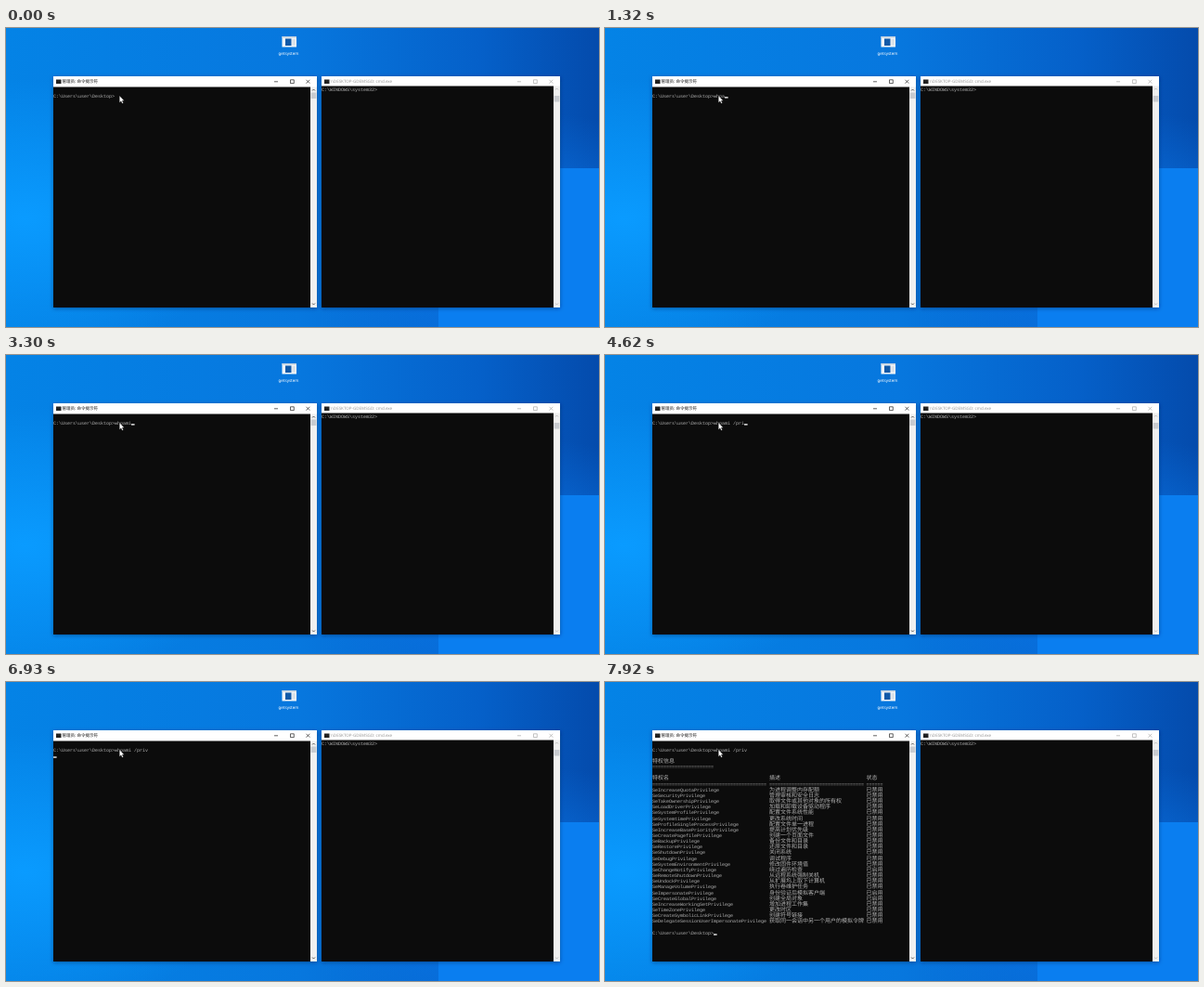
An HTML page for the animation above (8000 ms loop, 639 by 322 pixels).

```html
<!DOCTYPE html>
<html lang="zh-CN">
<head>
<meta charset="utf-8">
<title>Console session</title>
<style>
  html, body { margin: 0; width: 100%; height: 100%; overflow: hidden; background: #0878dc; }
  svg { display: block; width: 100%; height: 100%; }
  text { white-space: pre; text-rendering: geometricPrecision; }
  .ui { font: 4.5px "Noto Sans", "Noto Sans CJK SC", "Noto Sans CJK", sans-serif; }
  .mono { font: 5px "Liberation Mono", monospace; fill: #b4b4b4; }
  .han { font: 6px "Noto Sans CJK SC", "Noto Sans CJK", sans-serif; fill: #b4b4b4; }
</style>
</head>
<body>
<svg id="stage" viewBox="0 0 639 322" preserveAspectRatio="none">
  <defs>
    <linearGradient id="sky">
      <stop offset="0" stop-color="#0483e6"/>
      <stop offset=".5" stop-color="#0777de"/>
      <stop offset=".8" stop-color="#0560c9"/>
      <stop offset="1" stop-color="#044bac"/>
    </linearGradient>
    <radialGradient id="leftGlow">
      <stop offset="0" stop-color="#0a9bff"/>
      <stop offset="1" stop-color="#0a9bff" stop-opacity="0"/>
    </radialGradient>
    <radialGradient id="rightGlow">
      <stop offset="0" stop-color="#0a78ea"/>
      <stop offset="1" stop-color="#0a78ea" stop-opacity="0"/>
    </radialGradient>
    <filter id="shadow" x="-5%" y="-5%" width="110%" height="110%">
      <feDropShadow dx="0" dy="1" stdDeviation="2" flood-color="#002050" flood-opacity=".5"/>
    </filter>
  </defs>
  <rect width="639" height="322" fill="url(#sky)"/>
  <ellipse cx="20" cy="205" rx="240" ry="150" fill="url(#leftGlow)"/>
  <ellipse cx="560" cy="250" rx="240" ry="160" fill="url(#rightGlow)"/>
  <rect x="466" y="151" width="173" height="171" fill="#0a7ef0"/>
  <g id="icon">
    <rect x="297.5" y="9" width="15.5" height="11.5" fill="#f2f5f8"/>
    <rect x="297.5" y="9" width="15.5" height="1.6" fill="#c5d3e0"/>
    <rect x="301" y="11.5" width="6.5" height="7.5" fill="#125aa8"/>
    <rect x="308.5" y="12" width="3.5" height="6.5" fill="#dbe2e8"/>
    <text class="ui" x="304.5" y="28.8" text-anchor="middle" fill="#fff">getsystem</text>
  </g>
  <g id="windows"></g>
  <g id="typed">
    <text id="command" class="mono" x="51" y="74.6"></text>
    <g id="output"></g>
    <rect id="cursor" width="3.6" height="1.5" fill="#e0e0e0"/>
  </g>
  <path d="M122.3 73v7.2l1.7-1.5 1.2 2.6 1.2-.6-1.2-2.5h2.1z" fill="#fff" stroke="#222" stroke-width=".3"/>
</svg>
<script>
const LOOP = 8000, LEFT = 51, CELL = 3, BASE = 74.6, PITCH = 6.16;
const PROMPT = 'C:\\Users\\user\\Desktop>';
const DESC_COL = 42, STATE_COL = 76.8;
const $ = id => document.getElementById(id);

function add(parent, tag, attrs, content = '') {
  const node = document.createElementNS('http://www.w3.org/2000/svg', tag);
  for (const key in attrs) node.setAttribute(key, attrs[key]);
  node.textContent = content;
  return parent.appendChild(node);
}

const rowY = row => BASE + row * PITCH;
const print = (row, col, content, cls = 'mono') =>
  add($('output'), 'text', { class: cls, x: LEFT + col * CELL, y: rowY(row) }, content);

function drawWindow({ x, width, top, title, ink, controls, thumb }) {
  const g = add($('windows'), 'g', {});
  const right = x + width, bar = right - 7;
  const rect = (rx, ry, w, h, fill) => add(g, 'rect', { x: rx, y: ry, width: w, height: h, fill });
  const line = d => add(g, 'path', { d, fill: 'none', stroke: controls, 'stroke-width': .7 });

  rect(x, 52, width, 249, '#fff').setAttribute('filter', 'url(#shadow)');
  rect(x, top, bar - x, 301 - top, '#0c0c0c');
  rect(bar, top, 7, 301 - top, '#f0f0f0');
  rect(bar + .6, thumb, 5.8, 6.5, '#c8cbd0');
  line(`M${bar + 2} ${top + 4}l1.5-1.5 1.5 1.5M${bar + 2} 296.5l1.5 1.5 1.5-1.5`);
  rect(x + 3, 55.5, 5.5, 4.5, '#222');
  add(g, 'text', { class: 'ui', x: x + 9.5, y: 59.4, fill: ink }, title);
  line(`M${right - 46} 57.8h4M${right - 28.5} 55.8h3.8v3.8h-3.8zM${right - 11.5} 55.8l3.8 3.8m0-3.8l-3.8 3.8`);
}

drawWindow({ x: 51, width: 284, top: 63.5, title: '管理员: 命令提示符', ink: '#111', controls: '#222', thumb: 69.5 });
drawWindow({ x: 340, width: 257, top: 62.5, title: '\\\\DESKTOP-GDEMSGD: cmd.exe', ink: '#999', controls: '#aaa', thumb: 73 });
add($('windows'), 'text', { class: 'mono', x: 340, y: 68 }, 'C:\\WINDOWS\\system32>');

const privileges = `IncreaseQuota 为进程调整内存配额
Security 管理审核和安全日志
TakeOwnership 取得文件或其他对象的所有权
LoadDriver 加载和卸载设备驱动程序
SystemProfile 配置文件系统性能
Systemtime 更改系统时间
ProfileSingleProcess 配置文件单一进程
IncreaseBasePriority 提高计划优先级
CreatePagefile 创建一个页面文件
Backup 备份文件和目录
Restore 还原文件和目录
Shutdown 关闭系统
Debug 调试程序
SystemEnvironment 修改固件环境值
ChangeNotify 绕过遍历检查 +
RemoteShutdown 从远程系统强制关机
Undock 从扩展坞上取下计算机
ManageVolume 执行卷维护任务
Impersonate 身份验证后模拟客户端 +
CreateGlobal 创建全局对象 +
IncreaseWorkingSet 增加进程工作集
TimeZone 更改时区
CreateSymbolicLink 创建符号链接
DelegateSessionUserImpersonate 获取同一会话中另一个用户的模拟令牌`.split('\n');

print(2, 0, '特权信息', 'han');
print(3, 0, '='.repeat(22));
[[0, '特权名', 41], [DESC_COL, '描述', 34], [STATE_COL, '状态', 6]].forEach(([col, head, size]) => {
  print(5, col, head, 'han');
  print(6, col, '='.repeat(size));
});
privileges.forEach((entry, i) => {
  const [name, description, enabled] = entry.split(' ');
  print(7 + i, 0, `Se${name}Privilege`);
  print(7 + i, DESC_COL, description, 'han');
  print(7 + i, STATE_COL, enabled ? '已启用' : '已禁用', 'han');
});
print(32, 0, PROMPT);

// start time, typed command, cursor row (-1 = hidden)
const steps = [
  [0, '', -1], [660, '', 0], [990, 'wh', 0], [1320, 'whoa', 0],
  [1650, 'whoam', 0], [1980, 'whoami', 0], [2640, 'whoami', -1], [3300, 'whoami', 0],
  [3960, 'whoami /', 0], [4290, 'whoami /p', 0], [4620, 'whoami /pri', 0],
  [4950, 'whoami /priv', 0], [5280, 'whoami /priv', -1], [5940, 'whoami /priv', 0],
  [6270, 'whoami /priv', -1], [6930, 'whoami /priv', 1], [7260, 'whoami /priv', 32]
];

let shown;
function render(time) {
  const step = steps.findLast(([start]) => start <= time);
  if (step === shown) return;
  shown = step;
  const [, typed, row] = step;
  const column = { 0: PROMPT.length + typed.length, 1: 0, 32: PROMPT.length }[row] ?? 0;
  $('command').textContent = PROMPT + typed;
  $('output').style.display = row === 32 ? '' : 'none';
  $('cursor').style.display = row < 0 ? 'none' : '';
  $('cursor').setAttribute('x', LEFT + column * CELL);
  $('cursor').setAttribute('y', rowY(row) - .5);
}

const begin = performance.now();
function tick() {
  render((performance.now() - begin) % LOOP);
  requestAnimationFrame(tick);
}
tick();
</script>
</body>
</html>
```
